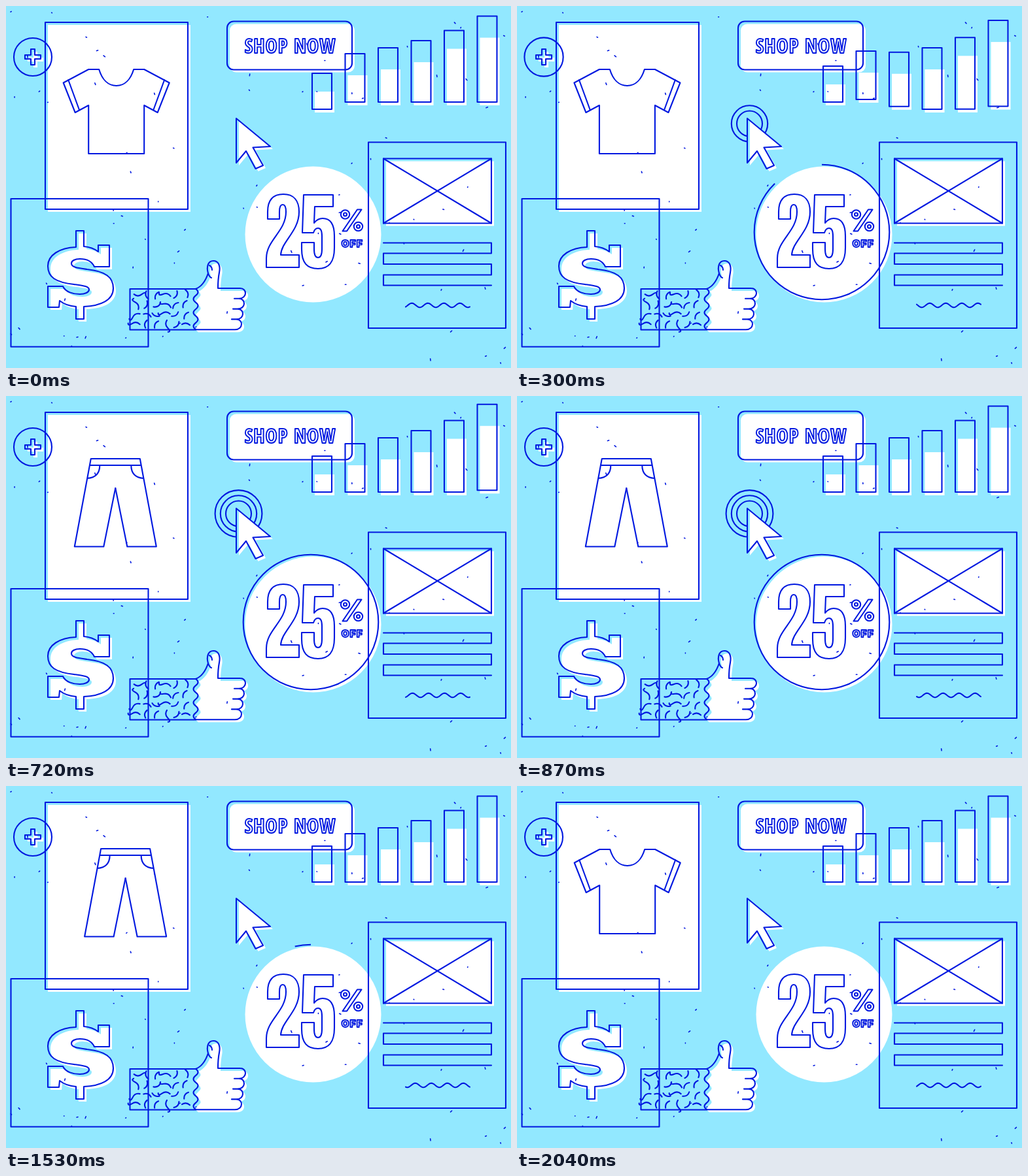
Recreate the animation shown at these times as an HTML page. Size 772 px wide and 554 px high, loop 2070 ms.

```html
<!DOCTYPE html>
<html lang="en">
<head>
<meta charset="utf-8">
<title>Shop illustration</title>
<style>
html, body { margin: 0; width: 100%; height: 100%; overflow: hidden; background: #92e8ff; }
svg { display: block; width: 772px; height: 554px; }
.line { fill: none; stroke: #0018e0; stroke-width: 2.1; stroke-linejoin: round; stroke-linecap: round; }
.white { fill: #fff; }
text { font-weight: 700; fill: #fff; text-anchor: middle; }
#shop { font-family: "Open Sans Condensed", "Roboto Condensed", Roboto, sans-serif; font-stretch: 75%; letter-spacing: 1px; }
#off { font: 900 15px Inter, sans-serif; letter-spacing: 1.5px; }
#ring { stroke-linecap: butt; }
#dust { stroke-width: 1.6; }
</style>
</head>
<body>
<svg viewBox="0 0 772 554">
  <defs>
    <rect id="card" x="60" y="25" width="218" height="286"/>
    <rect id="button" x="338" y="23.5" width="191" height="74" rx="10"/>
    <rect id="photo" x="577" y="233.5" width="165" height="99"/>
    <path id="plus" d="M38 66h6v9h9v6h-9v9h-6v-9h-9v-6h9z"/>
    <path id="dollar" d="M107 369V344H119V368Q132 369 141 376V366H158V399H135C131 390 122 387 113 387C105 387 100 390 100 394C100 400 110 401 124 403C152 406 164 415 164 432C164 450 145 459 119 460V479H107V460Q92 459 82 451L81 461H64V429H87C91 438 103 441 113 441C121 441 127 438 127 434C127 429 118 428 104 426C76 423 64 415 64 398C64 381 82 370 107 369Z"/>
    <path id="hand"/>
    <path id="arrow" d="M352 172L404 215L377.500 216.500L393 244L381.500 249L367 222L352 240Z"/>
    <path id="teeHalf" d="M0 122C13 122 22 112 26.500 97H42.500L81 117.500L63 163L42.500 152V226H0M73.500 113L56.500 159.500"/>
    <path id="pantsHalf" d="M0 141L18 230.500H62.500L37.500 96H0M0 106H39M24 106C24 118 30 125 43 126"/>
    <clipPath id="cardClip"><use href="#card"/></clipPath>
  </defs>

  <g class="white" transform="translate(4 4)">
    <use href="#card"/><use href="#button"/><use href="#photo"/>
    <use href="#plus"/><use href="#dollar"/><use href="#hand"/>
    <circle cx="465.500" cy="345.500" r="104"/>
  </g>

  <g class="line">
    <use href="#card"/><use href="#button"/><use href="#photo"/>
    <use href="#plus"/><use href="#dollar"/><use href="#hand"/>
    <circle id="badge" cx="41" cy="78"/>
    <rect x="7.500" y="295" width="210" height="226.500"/>
    <rect x="554" y="208.500" width="210" height="284.500"/>
    <path d="M577 233.500l165 99m0 -99l-165 99"/>
    <path d="M577 362.500h165v16h-165v16.500h165v16.500h-165v16h165"/>
    <path id="wave"/>

    <path d="M290 433H189.500V495.500H290M311 397q4 2 4 7M309 409q2 6 5 7"/>
    <path id="squiggles"/>

    <circle id="ring" cx="466" cy="346" r="103.300" pathLength="1" transform="rotate(-90 466 346)"/>
    <path d="M400 326V315C400 297 408 288 424 288S448 298 448 315C448 345 421 360 420 381H448V400H398V386C398 358 428 345 428 315C428 308 427 304 423 304S418 308 418 315V326Z"/>
    <path d="M455 289H500V307H472L471 332C475 327 479 325 484 325C497 325 502 335 502 352V370C502 392 494 402 477 402S452 393 452 372V362H471V372C471 381 473 385 477 385S483 381 483 372V352C483 344 481 340 477 340Q472 340 470 347H453Z"/>
    <path d="M537 311.500h6.500l-22.500 33h-6.500z"/>
    <circle cx="518.500" cy="319" r="6.700"/><circle cx="518.500" cy="319" r="2.500"/>
    <circle cx="538.500" cy="337.500" r="6.700"/><circle cx="538.500" cy="337.500" r="2.500"/>

    <g clip-path="url(#cardClip)">
      <g id="tee"><use href="#teeHalf"/><use href="#teeHalf" transform="scale(-1 1)"/></g>
      <g id="pants"><use href="#pantsHalf"/><use href="#pantsHalf" transform="scale(-1 1)"/></g>
    </g>

    <g stroke-width="1.900">
      <text id="shop" x="434.500">SHOP NOW</text>
      <text id="off" x="529.500" y="369">OFF</text>
    </g>
  </g>

  <g id="bars"></g>
  <g id="clicks" class="line"></g>
  <use href="#arrow" fill="#92e8ff"/>
  <use href="#arrow" class="white" transform="translate(4 4)"/>
  <use href="#arrow" class="line"/>
  <path id="dust" class="line"/>
</svg>
<script>
const $ = id => document.getElementById(id);
const LOOP = 2070, TAU = 2 * Math.PI;
const span = (t, start, length) => Math.max(0, Math.min(1, (t - start) / length));
const smooth = x => x * x * (3 - 2 * x);
const quad = x => x < .5 ? 2 * x * x : 1 - 2 * (1 - x) ** 2;
const cubic = x => x < .5 ? 4 * x ** 3 : 1 - 4 * (1 - x) ** 3;
const repeat = (n, make) => Array.from({ length: n }, (_, i) => make(i)).join('');

let seed = 7;
const random = (low, high) => {
  seed = (seed * 16807) % 2147483647;
  return low + (high - low) * seed / 2147483647;
};

// Fit the lettering inside the button by its font size.
const shop = $('shop');
shop.style.fontSize = '34px';
const size = Math.min(34, 34 * 139 / shop.getComputedTextLength());
shop.style.fontSize = size + 'px';
shop.setAttribute('y', 61 + size * .357);

// Thumb, four fingers with creases, scalloped cuff.
$('hand').setAttribute('d',
  'M290 433C300 429 306 418 309 409C306 399 309 390 317 390S328 398 326 408Q324 418 324 432H358'
  + repeat(4, () => 'c11 0 11 15.8 -2 15.8h-7h7') + 'H290q-7 -5 0 -10.4' + repeat(5, () => 't0 -10.4'));

// Short arcs and S-curves at scattered angles on the sleeve.
$('squiggles').setAttribute('d', repeat(24, i => {
  const a = random(0, TAU), dx = 6 * Math.cos(a), dy = 6 * Math.sin(a);
  const x = 200 + i % 6 * 15 + random(-2, 2), y = 442 + (i / 6 | 0) * 15 + random(-2, 2);
  const tail = i % 3 ? '' : `t${dx} ${dy}`;
  return `M${x - dx} ${y - dy}q${dx - dy * .8} ${dy + dx * .8} ${dx * 2} ${dy * 2}${tail}`;
}));

$('dust').setAttribute('d', repeat(80, () => {
  const a = random(0, TAU), r = random(.5, 3);
  return `M${random(5, 767)} ${random(5, 549)}l${r * Math.cos(a)} ${r * Math.sin(a)}`;
}));

const heights = [55, 74, 83, 94, 109.5, 131.5];
$('bars').innerHTML = repeat(6, i => {
  const x = 468 + 50.5 * i, h = heights[i], gap = i % 4 ? 33 : 28;
  return `<g><rect class="white" x="${x + 4}" y="${147 - h + gap}" width="30" height="${h + 5 - gap}"/>
    <rect class="line" x="${x}" y="${147 - h}" width="30" height="${h}"/></g>`;
});
const bounce = u => 11 * smooth(span(u, 0, 90)) - 15 * smooth(span(u, 140, 120)) + 4 * smooth(span(u, 290, 60));

$('clicks').innerHTML = repeat(3, i => `<circle cx="355.5" cy="180" r="${19.5 + 8.2 * i}"/>`);

function wavePath(phase) {
  return repeat(99, i => `${i ? 'L' : 'M'}${611 + i} ${458 + 3.2 * Math.cos(TAU * (i / 24.5 - phase + .12))}`);
}

function draw(t) {
  // Taller bars bounce later and more slowly.
  [...$('bars').children].forEach((bar, i) => {
    const u = (t + 60 - 125 * Math.sqrt(i)) * 82 / heights[i];
    bar.setAttribute('transform', `translate(0 ${bounce(u)})`);
  });

  [...$('clicks').children].forEach((circle, i) => {
    const shown = t >= 110 + 140 * i && t < 1290 + 60 * i;
    circle.style.display = shown ? '' : 'none';
  });

  const from = quad(span(t, 1186, 400)), to = quad(span(t, 0, 400));
  $('ring').setAttribute('stroke-dasharray', `0 ${from} ${to - from} 2`);
  $('wave').setAttribute('d', wavePath(t / 690));
  $('badge').setAttribute('r', 29 + 2 * Math.sin(Math.PI * span(t, 255, 240)) ** 2);

  const slide = 218 * (cubic(span(t, 280, 300)) - cubic(span(t, 1453, 300)));
  $('tee').setAttribute('transform', `translate(${168.7 - slide} 0)`);
  $('pants').setAttribute('transform', `translate(${385.3 - slide} 0)`);
}

const begin = performance.now();
function frame() {
  draw((performance.now() - begin) % LOOP);
  requestAnimationFrame(frame);
}
frame();
</script>
</body>
</html>
```
